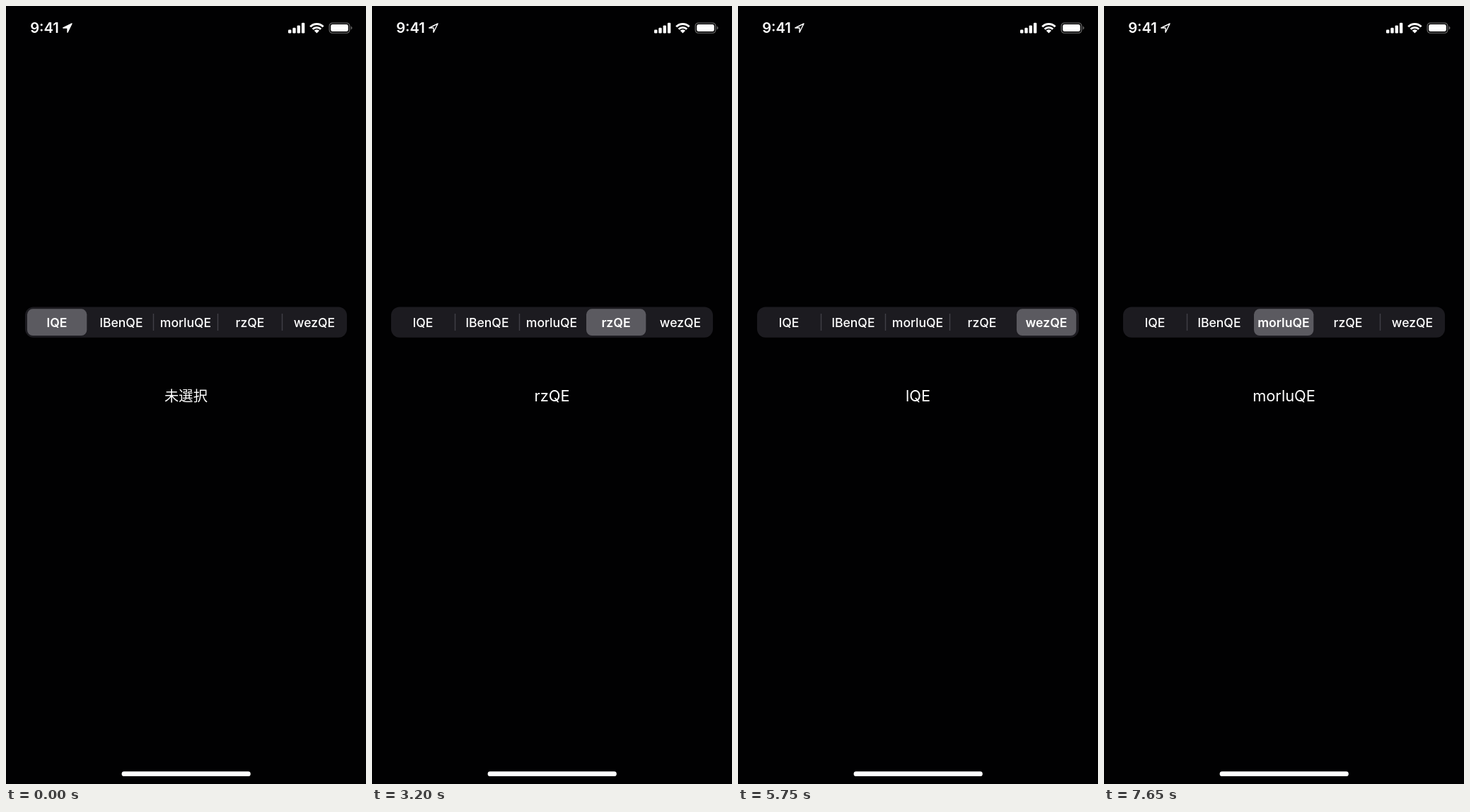
Recreate the animation shown at these times as an HTML page. Size 509 by 1100 pixels, loop 8000 ms.

```html
<!DOCTYPE html>
<html lang="ja">
<head>
<meta charset="utf-8">
<title>Segmented control</title>
<style>
  html, body { margin: 0; width: 100%; height: 100%; overflow: hidden; background: #010102; }
  svg { display: block; width: 100%; height: 100%; }
  text { fill: #fff; font-family: Inter, "Noto Sans CJK JP", "Noto Sans CJK", sans-serif; text-anchor: middle; }
  .segment { font-size: 17.6px; font-weight: 500; }
  .segment.selected { font-weight: 600; }
  #result { font-size: 21.8px; font-weight: 400; }
  #result.empty { font-size: 20.3px; font-weight: 300; font-family: "Noto Sans CJK JP", "Noto Sans CJK", sans-serif; }
  #clock { font-size: 20.2px; font-weight: 600; }
</style>
</head>
<body>
<svg viewBox="0 0 509 1100">
  <text id="clock" x="54.5" y="38.3">9:41</text>
  <path id="location" d="M93 25 80.8 31H87V37.2Z" stroke="#fff" stroke-width="1.4" stroke-linejoin="round"/>

  <g fill="#fff">
    <rect x="399" y="33.5" width="4.4" height="5" rx="1.2"/>
    <rect x="405.3" y="30.8" width="4.4" height="7.7" rx="1.2"/>
    <rect x="411.6" y="27.4" width="4.4" height="11.1" rx="1.2"/>
    <rect x="417.9" y="23.8" width="4.4" height="14.7" rx="1.2"/>
    <path d="M439.4 38.5 435.7 34.8A5.3 5.3 0 0 1 443.1 34.8Z"/>
  </g>
  <g fill="none" stroke="#fff" stroke-width="2.9">
    <path d="M430.2 29.3A13 13 0 0 1 448.6 29.3"/>
    <path d="M433.6 32.8A8.2 8.2 0 0 1 445.2 32.8"/>
  </g>
  <rect x="457.2" y="24.1" width="28.6" height="14" rx="4" fill="none" stroke="#666" stroke-width="1.3"/>
  <rect x="459.2" y="26.1" width="24.6" height="10" rx="2.4" fill="#fff"/>
  <path d="M487.6 28.6Q489.5 29.3 489.5 31.1T487.6 33.6Z" fill="#666"/>

  <rect x="27" y="425.5" width="455" height="43.2" rx="12" fill="#1c1b20"/>
  <g id="separators" fill="#414047"></g>
  <rect id="thumb" y="428.3" width="84.3" height="37.8" rx="8" fill="#5b5a60"/>
  <g id="segments"></g>
  <text id="result" x="254.5" y="558.5"></text>

  <rect x="163.6" y="1082.3" width="182.2" height="6.8" rx="3.4" fill="#fff"/>
</svg>
<script>
const LOOP = 8000, PITCH = 91;
const names = ["lQE", "lBenQE", "morluQE", "rzQE", "wezQE"];
const taps = [
  { start: 500, end: 900, to: 1 },
  { start: 1600, end: 2050, to: 2 },
  { start: 2800, end: 3200, to: 3 },
  { start: 4050, end: 4500, to: 4 },
  { start: 5750, end: 6150, to: 0 },
  { start: 7250, end: 7650, to: 2 },
];
const LOCATION_OFF = 3000;

const byId = id => document.getElementById(id);
const [thumb, result, locationArrow] = ["thumb", "result", "location"].map(byId);

function add(parent, tag, attributes) {
  const node = document.createElementNS("http://www.w3.org/2000/svg", tag);
  for (const key in attributes) node.setAttribute(key, attributes[key]);
  return byId(parent).appendChild(node);
}

const segments = names.map((name, i) => {
  const node = add("segments", "text", { class: "segment", x: 72 + PITCH * i, y: 453.5 });
  node.textContent = name;
  return node;
});
const separators = [0, 1, 2, 3].map(i =>
  add("separators", "rect", { x: 116.8 + PITCH * i, y: 435, width: 1.4, height: 24 }));

// Critically damped spring, normalised to reach 1 at p = 1.
const spring = p => 1 - (1 + 8 * p) * Math.exp(-8 * p);
const settle = p => p >= 1 ? 1 : spring(p) / spring(1);
const mix = (a, b, p) => a + (b - a) * p;
const separatorShown = (i, selected) => i === selected || i === selected - 1 ? 0 : 1;

function draw(t) {
  let from = 0, to = 0, p = 1, touched = false;
  for (const tap of taps) {
    if (t < tap.start) break;
    from = to;
    to = tap.to;
    p = settle((t - tap.start) / (tap.end - tap.start));
    touched = true;
  }
  thumb.setAttribute("x", 30 + PITCH * mix(from, to, p));
  separators.forEach((node, i) =>
    node.setAttribute("opacity", mix(separatorShown(i, from), separatorShown(i, to), p)));
  const bold = p < 0.5 ? from : to;
  segments.forEach((node, i) => node.classList.toggle("selected", i === bold));

  result.textContent = touched ? names[to] : "未選択";
  result.classList.toggle("empty", !touched);
  locationArrow.setAttribute("fill", t < LOCATION_OFF ? "#fff" : "none");
}

const began = performance.now();
function tick() {
  draw((performance.now() - began) % LOOP);
  requestAnimationFrame(tick);
}
tick();
</script>
</body>
</html>
```
